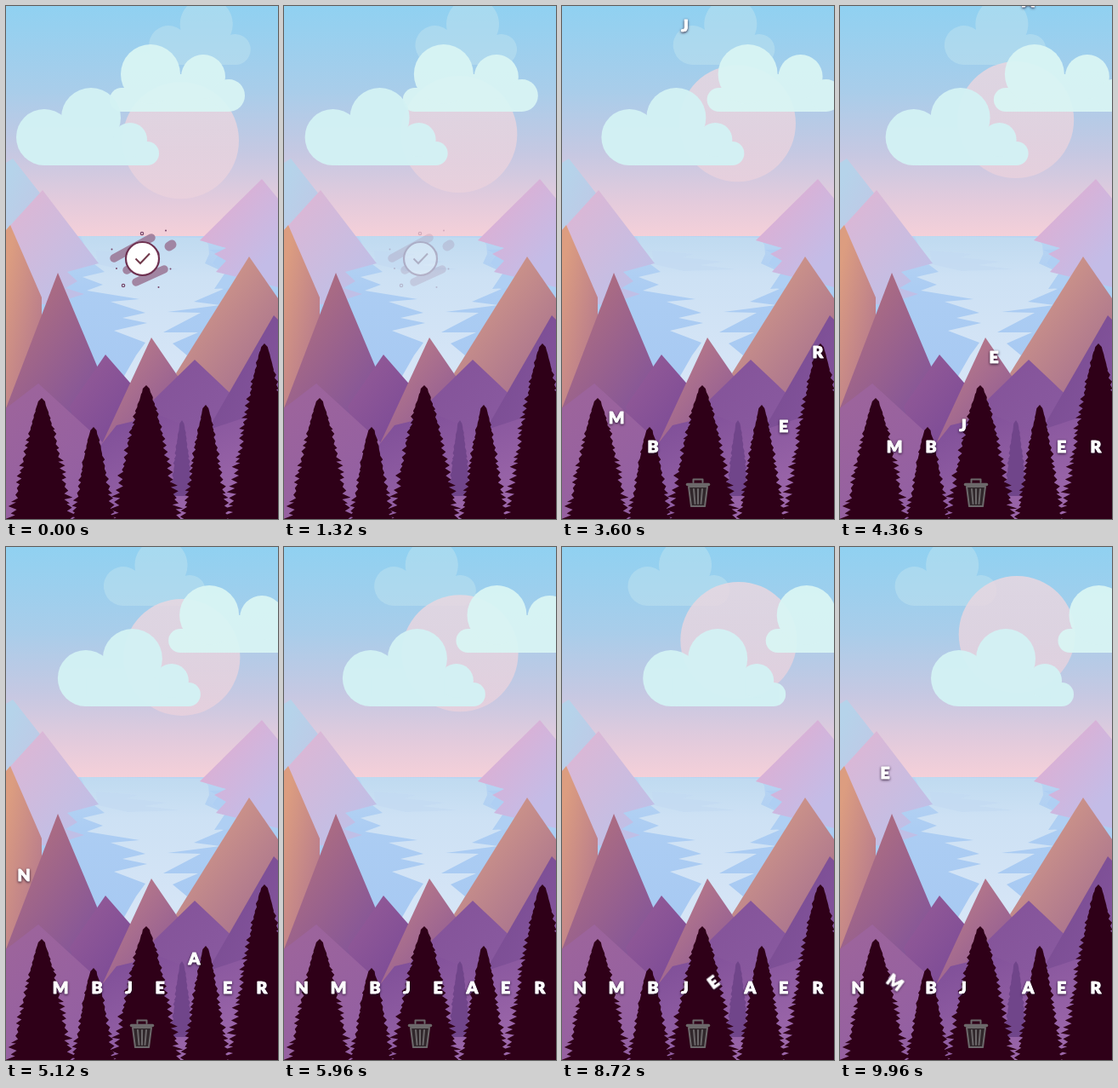
Recreate the animation shown at these times as an HTML page. Size 320 px wide and 602 px high, loop 10 s.

```html
<!DOCTYPE html>
<html lang="en">
<head>
<meta charset="utf-8">
<title>Falling letters</title>
<style>
html, body { margin: 0; width: 100%; height: 100%; overflow: hidden; background: #92d0f0; }
svg { display: block; width: 320px; height: 602px; }
.letter {
  font: 900 19.5px Lato, "Open Sans", sans-serif;
  text-anchor: middle; fill: #fff; stroke: #fff; stroke-width: .9; stroke-linejoin: round;
  filter: drop-shadow(0 1px 1.5px rgba(25, 8, 35, .9));
}
</style>
</head>
<body>
<svg id="stage" viewBox="0 0 320 602" xmlns="http://www.w3.org/2000/svg">
  <defs>
    <linearGradient id="sky" x2="0" y2="1">
      <stop offset="0" stop-color="#90d1f1"/>
      <stop offset=".36" stop-color="#a8cdea"/>
      <stop offset=".64" stop-color="#c6c8e2"/>
      <stop offset=".85" stop-color="#e4cbdc"/>
      <stop offset="1" stop-color="#f5d0d8"/>
    </linearGradient>
    <linearGradient id="sunFill" x2="0" y2="1">
      <stop offset="0" stop-color="#e9d7e0" stop-opacity=".85"/>
      <stop offset="1" stop-color="#ecd2dc" stop-opacity=".72"/>
    </linearGradient>
    <linearGradient id="sea" x2="0" y2="1">
      <stop offset="0" stop-color="#b9d5f2"/>
      <stop offset=".3" stop-color="#accdf3"/>
      <stop offset="1" stop-color="#a6c8f2"/>
    </linearGradient>
    <linearGradient id="glow" x2="0" y2="1">
      <stop offset="0" stop-color="#bfdaf0"/>
      <stop offset=".25" stop-color="#cde1f4"/>
      <stop offset="1" stop-color="#d8e6f7"/>
    </linearGradient>
  </defs>

  <rect width="320" height="272" fill="url(#sky)"/>
  <g id="far" fill="#bfe3f0" fill-opacity=".5">
    <path d="M23 69A23 23 0 1 1 37.500 28A31 31 0 1 1 96 34A18 18 0 1 1 103 69Z"/>
  </g>
  <circle id="sun" r="68.500" fill="url(#sunFill)"/>
  <g id="mid" fill="#d9f5f4" opacity=".95">
    <path d="M14 124H140V96H14Z"/>
    <circle cx="14" cy="110" r="14"/><circle cx="48" cy="80" r="35"/>
    <circle cx="110" cy="83" r="26"/><circle cx="140" cy="105" r="19"/>
    <path d="M48 80H110V110H48Z"/>
  </g>
  <g id="near" fill="#d3f2f4" opacity=".96">
    <path d="M33 187H154V159H33Z"/>
    <circle cx="33" cy="154" r="33"/><circle cx="88" cy="131" r="35"/>
    <circle cx="134" cy="157" r="20"/><circle cx="154" cy="173" r="14"/>
    <path d="M34 154H120V175H34Z"/>
  </g>
  <rect y="270" width="320" height="200" fill="url(#sea)"/>
  <path fill="url(#glow)" d="M88 270L232 272L238 280L239 291L234 302L258 313L247 330L256 332L221 347L252 351L190 359L229 360L185 383L226 383L196 396L213 410L185 460L130 450L153 410L164 395L127 381L166 372L137 366L164 360L123 347L157 344L95 334L114 327L90 318L116 312L100 300Z"/>
  <path fill="#c3daf3" opacity=".7" d="M106 287L155 291L142 295L190 300L163 304L205 309L143 311L108 303Z"/>
  <path fill="#afcff3" d="M239 286L250 292L243 302L258 313L245 332L275 330V285Z"/>
  <g id="hills"></g>
  <g id="trees"></g>

  <g id="bin" fill="none" stroke="#6c686a" stroke-width="2" stroke-linecap="round" stroke-linejoin="round">
    <path d="M149 564L152 587H168L171 564Z" fill="#30272b"/>
    <path d="M155 567L156.500 584M160 567V584M165 567L163.500 584"/>
    <path d="M147.500 561.500H172.500" stroke-width="3.500"/>
    <path d="M154.500 559V555.500H165.500V559"/>
  </g>

  <g id="badge">
    <g stroke="#9a7695" stroke-opacity=".85" stroke-linecap="round" stroke-width="9.500">
      <path d="M127 296L171 272"/>
      <path d="M142 310L176 291"/>
      <path d="M153 324L186 309"/>
      <path d="M192 282L195 280" stroke-width="11"/>
    </g>
    <circle cx="160.500" cy="296.500" r="19.500" fill="#fff" stroke="#6e3150" stroke-width="2.200"/>
    <path d="M152.500 296.500L158 302L169 290.500" fill="none" stroke="#713a4b" stroke-width="2"/>
    <g fill="none" stroke="#76476a" stroke-width="1.200">
      <circle cx="160" cy="267" r="1.700"/><circle cx="138" cy="328" r="1.700"/>
    </g>
    <g fill="#76476a">
      <circle cx="188" cy="263.500" r="1"/><circle cx="124.500" cy="285.500" r="1"/>
      <circle cx="193.500" cy="308.500" r="1"/><circle cx="179.500" cy="330" r="1"/>
      <circle cx="130" cy="308" r="1"/>
    </g>
  </g>
  <g id="letters"></g>
</svg>
<script>
const NS = "http://www.w3.org/2000/svg";
const $ = id => document.getElementById(id);
const LOOP = 10000, REST = 517, TOP = -20, FALL = 1000, FLIGHT = 700;

function add(parent, tag, attrs) {
  const el = document.createElementNS(NS, tag);
  for (const k in attrs) el.setAttribute(k, attrs[k]);
  parent.appendChild(el);
  return el;
}

// Each hill: outline, then colours from upper left to lower right.
const hills = [
  ["0,184 8,179 60,245 60,300 0,300", "#b5d3ea", "#c3c4e4"],
  ["0,263 43,216 109,302 72,312 84,323 70,331 92,338 76,343 60,350 0,350", "#dcb7d5", "#c0bfe6"],
  ["228,275 301,203 320,226 320,330 280,320 247,312 259,299 245,291 259,284", "#e1add0", "#c3bce7"],
  ["0,263 5,257 42,342 42,440 0,480", "#dc9d80", "#b67a8d"],
  ["200,431 286,294 320,343 320,470 215,470", "#d79d87", "#a9738f"],
  ["0,472 61,313 125,465 125,520 0,520", "#b2707f", "#80539b"],
  ["75,470 117,409 152,449 140,520 90,520", "#935a96", "#7d4c97"],
  ["110,520 171,389 232,478 232,560 110,560", "#bb7c88", "#81509a"],
  ["150,485 222,415 275,465 275,602 150,602", "#845399", "#8b5ca2"],
  ["230,510 315,363 320,368 320,602 230,602", "#784b91", "#86569e"],
  ["0,472 38,443 150,545 150,602 0,602", "#9c649c", "#925fa3"],
  ["100,530 130,492 180,480 230,500 320,470 320,602 90,602", "#7f4f98", "#9c67aa"]
];
const defs = document.querySelector("defs");
hills.forEach(([points, from, to], i) => {
  const grad = add(defs, "linearGradient", { id: "hill" + i, x1: .15, y1: .1, x2: .75, y2: .85 });
  add(grad, "stop", { offset: 0, "stop-color": from });
  add(grad, "stop", { offset: 1, "stop-color": to });
  add($("hills"), "polygon", { points, fill: `url(#hill${i})` });
});

let seed = 11;
const rand = () => (seed = seed * 16807 % 2147483647) / 2147483647;

function tree(x, top, half, bottom, fill) {
  const edge = side => {
    const pts = [];
    for (let y = top + 7; y < bottom; y += 5 + rand() * 4) {
      const w = 1.5 + half * Math.pow((y - top) / (bottom - top), .78);
      pts.push([x + side * w * (.74 + rand() * .1), y - 3]);
      pts.push([x + side * w * (.92 + rand() * .16), y + 1.5]);
    }
    return pts;
  };
  const points = [[x, top], ...edge(1), [x + half * .8, bottom], [x - half * .8, bottom], ...edge(-1).reverse()];
  add($("trees"), "polygon", { points: points.map(p => p.map(v => v.toFixed(1))).join(" "), fill });
}
tree(207, 486, 13, 575, "#70458a");
tree(42, 460, 39, 604, "#2f0018");
tree(103, 494, 26, 604, "#2f0018");
tree(165, 445, 43, 604, "#2f0018");
tree(235, 468, 28, 604, "#2f0018");
tree(304, 396, 47, 604, "#2f0018");

const letters = [
  { char: "N", x: 21, drop: 4600 },
  { char: "M", x: 64, drop: 2782, fly: 9890, to: [93, 265], spin: 360 },
  { char: "B", x: 107, drop: 2095 },
  { char: "J", x: 144.5, drop: 3498 },
  { char: "E", x: 181, drop: 3900, fly: 8650, to: [53, 265], spin: -360 },
  { char: "A", x: 221.5, drop: 4302 },
  { char: "E", x: 260.5, drop: 2734 },
  { char: "R", x: 301, drop: 3132 }
];
for (const l of letters) {
  l.el = add($("letters"), "g", {});
  add(l.el, "text", { class: "letter", y: 7 }).textContent = l.char;
}

const clamp = v => Math.max(0, Math.min(1, v));
const ease = p => (1 - Math.cos(Math.PI * p)) / 2;

function bounce(p) {
  const k = 7.5625, d = 2.75;
  if (p < 1 / d) return k * p * p;
  if (p < 2 / d) return k * (p - 1.5 / d) ** 2 + .75;
  if (p < 2.5 / d) return k * (p - 2.25 / d) ** 2 + .9375;
  return k * (p - 2.625 / d) ** 2 + .984375;
}

const move = (el, x, y = 0, turn = 0) =>
  el.setAttribute("transform", `translate(${x.toFixed(2)} ${y.toFixed(2)}) rotate(${turn.toFixed(2)})`);

function draw(t) {
  const s = t / 1000;
  move($("far"), 168 - 10.4 * s);
  move($("mid"), 122 + 13.5 * s);
  move($("near"), 12 + 9.54 * s);
  move($("sun"), 205.5 + .27 * s, 157.8 - 5.55 * s);

  $("badge").setAttribute("opacity", 1 - clamp((t - 1100) / 300));
  $("bin").setAttribute("opacity", clamp((t - 1800) / 300));

  for (const l of letters) {
    l.el.setAttribute("visibility", t < l.drop ? "hidden" : "visible");
    let x = l.x, y = TOP + (REST - TOP) * bounce(clamp((t - l.drop) / FALL)), turn = 0;
    if (l.fly && t > l.fly) {
      const p = clamp((t - l.fly) / FLIGHT), e = ease(p);
      x += (l.to[0] - x) * e;
      y += (l.to[1] - y) * e;
      turn = l.spin * p;
    }
    move(l.el, x, y, turn);
  }
}

function frame() {
  draw(performance.now() % LOOP);
  requestAnimationFrame(frame);
}
frame();
</script>
</body>
</html>
```
